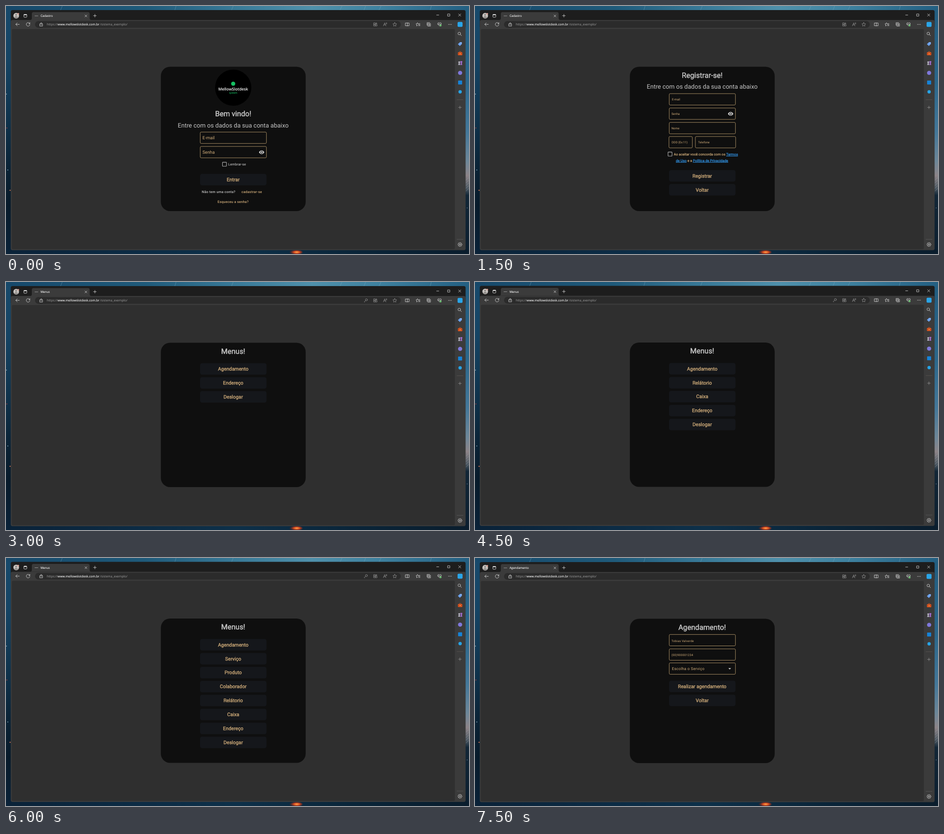
An HTML page that plays this animation: 1021x549 px, repeating every 9000 ms.

```html
<!DOCTYPE html>
<html lang="pt-BR">
<head>
<meta charset="utf-8">
<title>Cadastro</title>
<style>
  html, body { margin: 0; width: 100%; height: 100%; overflow: hidden; background: #0b2437; }
  svg { display: block; width: 100vw; height: 100vh; }
  text { font-family: Roboto, Arial, sans-serif; white-space: pre; text-rendering: geometricPrecision; }
  .ui text { font-family: "Open Sans", "Noto Sans", sans-serif; }
  .line { fill: none; stroke: #dedede; stroke-width: .85; stroke-linecap: round; stroke-linejoin: round; }
  .dim { stroke: #969696; }
</style>
</head>
<body>
<svg id="stage" viewBox="0 0 1021 549" preserveAspectRatio="none" xmlns="http://www.w3.org/2000/svg"></svg>
<script>
const LOOP = 9000, STEP = 1500;
const TAN = '#d2ae7b', EDGE = '#b4976a', PALE = '#c6c6c6', BLUE = '#339af0';
const MID = 501;

// --- drawing helpers ---
const rect = (x, y, w, h, r, fill, extra = '') =>
  `<rect x="${x}" y="${y}" width="${w}" height="${h}" rx="${r}" fill="${fill}" ${extra}/>`;
const disc = (x, y, r, fill) => `<circle cx="${x}" cy="${y}" r="${r}" fill="${fill}"/>`;
const oval = (x, y, rx, ry, fill) => `<ellipse cx="${x}" cy="${y}" rx="${rx}" ry="${ry}" fill="${fill}"/>`;
const shape = (d, fill) => `<path d="${d}" fill="${fill}"/>`;
const icon = (x, y, d, cls = '', extra = '') =>
  `<path class="line ${cls}" transform="translate(${x} ${y})" d="${d}" ${extra}/>`;

// Text placed by the middle of its capitals.
function label(s, x, cy, size, fill, { anchor = 'start', bold = 0, gap = 0, weight = 400 } = {}) {
  const stroke = bold ? `stroke="${fill}" stroke-width="${bold}"` : '';
  return `<text x="${x}" y="${(cy + size * .356).toFixed(2)}" font-size="${size}" fill="${fill}" ` +
    `text-anchor="${anchor}" letter-spacing="${gap}" font-weight="${weight}" ${stroke}>${s}</text>`;
}
const centred = (s, cy, size, fill, bold = 0) =>
  label(s, MID, cy, size, fill, { anchor: 'middle', bold });

const heading = (s, cy) => centred(s, cy, 16.1, PALE, .5);
const subtitle = cy => centred('Entre com os dados da sua conta abaixo', cy, 13.55, PALE);
const field = (y, x = 428.3, w = 146) =>
  rect(x, y, w, 25.2, 2.2, 'none', `stroke="${EDGE}" stroke-width=".95"`);
const button = (s, cy) =>
  rect(428, cy - 12.7, 146.5, 25.5, 4.5, '#15171b') + centred(s, cy - .1, 10.75, TAN, .35);
const checkbox = (x, y) =>
  rect(x, y, 8.8, 8.8, .8, 'none', 'stroke="#b9b9b9" stroke-width="1.1"');
const eye = cy =>
  `<g transform="translate(563.7 ${cy})">` +
  shape('M-6 0Q-3.6 -4.1 0 -4.1T6 0Q3.6 4.1 0 4.1T-6 0Z', '#cfcfcf') +
  disc(0, 0, 2.8, '#0f0f0f') + disc(0, 0, 1.7, '#cfcfcf') + '</g>';
const small = (s, x, cy, gap = 0) => label(s, x, cy, 6.55, TAN, { gap });

// --- screens ---
function login() {
  const link = { gap: .25, weight: 500 };
  return disc(501, 180.7, 40, '#000') +
    disc(501, 172, 4.6, '#16c264') +
    `<g class="ui">${label('MellowSlotdesk', MID, 184, 8.7, '#fff', { anchor: 'middle', weight: 600 })}` +
    `${label('system', MID, 191.8, 5.2, '#16c264', { anchor: 'middle', weight: 600 })}</g>` +
    heading('Bem vindo!', 238) + subtitle(264) +
    field(279.1) + label('E-mail', 433.2, 292, 9.8, TAN) +
    field(310.9) + label('Senha', 433.2, 323.7, 9.8, TAN) + eye(323.8) +
    checkbox(477.4, 345.9) + label('Lembrar-se', 490, 350.5, 7.5, '#dcdcdc', { gap: .14 }) +
    button('Entrar', 384.3) +
    label('Não tem uma conta?', 431.8, 411.2, 7.5, PALE, link) +
    label('cadastrar-se', 519.3, 411.2, 7.5, TAN, link) +
    label('Esqueceu a senha?', 466.4, 433.5, 7.5, TAN, link);
}

function register() {
  const link = s => `<tspan fill="${BLUE}" stroke="${BLUE}" text-decoration="underline">${s}</tspan>`;
  const terms = { bold: .22 };
  return heading('Registrar-se!', 152.8) + subtitle(178.6) +
    field(194) + small('E-mail', 434.2, 206.7) +
    field(225.8) + small('Senha', 433.2, 238.6) + eye(238.7) +
    field(257.7) + small('Nome', 433.2, 270.5) +
    field(288.9, 427.7, 51.6) + small('DDD (Ex:11)', 433.8, 301.5) +
    field(288.9, 486, 88.8) + small('Telefone', 492, 301.5) +
    checkbox(425.7, 323.4) +
    label('Ao aceitar você concorda com os ' + link('Termos'), 438.3, 328.2, 7.68, TAN, terms) +
    label(link('de Uso') + ' e a ' + link('Política de Privacidade'), 443, 341.9, 7.68, TAN, terms) +
    button('Registrar', 375.9) + button('Voltar', 406.8);
}

const menu = items =>
  heading('Menus!', 152.8) + items.map((s, i) => button(s, 192.5 + i * 30.87)).join('');

const booking = () =>
  heading('Agendamento!', 152.8) +
  field(169.3) + small('Tobias Valverde', 433.2, 183.2, .22) +
  field(201.2) + small('(00)900001234', 433.2, 215, .22) +
  field(232.2) + label('Escolha o Serviço', 434.3, 244.8, 8.55, TAN, { gap: .26 }) +
  shape('M558.7 243.7h6l-3 3.1z', '#d6d6d6') +
  button('Realizar agendamento', 284.2) + button('Voltar', 315.1);

const scenes = [
  { tab: 'Cadastro', body: login() },
  { tab: 'Cadastro', body: register() },
  { tab: 'Menus', key: true, body: menu(['Agendamento', 'Endereço', 'Deslogar']) },
  { tab: 'Menus', key: true, lift: .5,
    body: menu(['Agendamento', 'Relátorio', 'Caixa', 'Endereço', 'Deslogar']) },
  { tab: 'Menus', key: true, lift: .5,
    body: menu(['Agendamento', 'Serviço', 'Produto', 'Colaborador', 'Relátorio', 'Caixa', 'Endereço', 'Deslogar']) },
  { tab: 'Agendamento', body: booking() },
];

// --- wallpaper ---
function gradient(id, axis, stops) {
  const end = axis === 'y' ? 'x2="0" y2="1"' : 'x2="1" y2="0"';
  return `<linearGradient id="${id}" x1="0" y1="0" ${end}>` +
    stops.map(([at, c]) => `<stop offset="${at}" stop-color="${c}"/>`).join('') + '</linearGradient>';
}

function wallpaper() {
  const rain = [[120, 4], [372, 3], [497, 4], [736, 5], [789, 4], [822, 5], [935, 3]]
    .map(([x, d]) => `M${x + d} 0L${x} 10`).join('');
  const tufts = [380, 386, 392, 398, 404].map(y => `M1014 ${y + 6}L1020 ${y}`).join('');
  return '<defs>' +
    gradient('top', 'x', [[0, '#16486a'], [.3, '#1f5a7a'], [.5, '#397a98'], [.66, '#4f90ab'], [.8, '#3f82a0'], [1, '#235f82']]) +
    gradient('left', 'y', [[0, '#17496b'], [.2, '#164464'], [.35, '#123a56'], [.5, '#0e2f47'], [.68, '#0a2133'], [.8, '#081b2b'], [1, '#0a2238']]) +
    gradient('right', 'y', [[0, '#225d80'], [.3, '#2b678b'], [.5, '#44789a'], [.62, '#6d8799'], [.68, '#8d8488'], [.73, '#4d5963'], [.76, '#122636'], [1, '#0b1e2f']]) +
    gradient('low', 'x', [[0, '#0a2238'], [.3, '#0c2c45'], [.5, '#0d3049'], [.75, '#0a2539'], [1, '#0a1d2d']]) +
    '<radialGradient id="glow" cx=".62"><stop offset="0" stop-color="#ffb650"/>' +
    '<stop offset=".4" stop-color="#d9481f"/><stop offset="1" stop-color="#5a1a16" stop-opacity="0"/></radialGradient>' +
    '</defs>' +
    rect(0, 0, 1021, 549, 0, '#0b2437') +
    rect(0, 0, 1021, 12, 0, 'url(#top)') + rect(0, 8, 12, 541, 0, 'url(#left)') +
    rect(1012, 8, 9, 541, 0, 'url(#right)') + rect(0, 539, 1021, 10, 0, 'url(#low)') +
    `<path d="${rain}" stroke="#86b3c8" stroke-width=".7" opacity=".6"/>` +
    `<path d="${tufts}" stroke="#a3a3a6" stroke-width=".7" opacity=".7"/>` +
    oval(637, 545, 17, 6, 'url(#glow)') +
    disc(1, 195, 1, '#8fb0c4') + disc(4, 363, 1.1, '#7fa0b4') + disc(9, 408, 1.3, '#c87050') +
    disc(2, 270, 1.2, '#7a3a42') + disc(1017, 447, 1, '#50667a');
}

// --- browser window ---
const STAR = 'M0 -4.2L1.3 -1.5L4.2 -1.1L2.1 1L2.6 3.9L0 2.5L-2.6 3.9L-2.1 1L-4.2 -1.1L-1.3 -1.5Z';
const PLUS = 'M-3.2 0h6.4M0 -3.2v6.4';

function gear() {
  let d = '';
  for (let i = 0; i <= 32; i++) {
    const a = i * Math.PI / 16, r = i % 4 < 2 ? 4.4 : 3.5;
    d += (i ? 'L' : 'M') + (r * Math.cos(a)).toFixed(2) + ' ' + (r * Math.sin(a)).toFixed(2);
  }
  return icon(1001, 528, d + 'ZM1.4 0A1.4 1.4 0 1 1 -1.4 0A1.4 1.4 0 1 1 1.4 0');
}

function titleBar() {
  return rect(10.5, 9, 1003, 40, 4, '#1d1d1d') +
    shape('M53 31Q57 31 57 27V17.5Q57 13.5 61 13.5H180.5Q184.5 13.5 184.5 17.5V27Q184.5 31 188.5 31Z', '#3b3b3b') +
    disc(22.5, 21.5, 6.2, '#c9c5c1') + disc(22.3, 19.6, 2.2, '#8f8b88') +
    shape('M18.3 25.7Q19 22.6 22.3 22.6T26.4 25.7Q22.5 28 18.3 25.7Z', '#8f8b88') +
    disc(27, 17.3, 1.9, '#e0a49a') +
    rect(39.3, 18.5, 6.6, 6.4, 1.2, 'none', 'stroke="#e4e4e4" stroke-width=".9"') +
    rect(39.3, 18.3, 6.6, 2, .8, '#e4e4e4') +
    rect(63.3, 21.5, 7.4, .9, 0, '#a9a9a9') +
    icon(176.3, 22, 'M-2.2 -2.2L2.2 2.2M2.2 -2.2L-2.2 2.2') +
    icon(196, 21.5, PLUS) +
    icon(952, 20, 'M-2.5 0h5') + icon(976.5, 20, 'M-2.3 -2.3h4.6v4.6h-4.6Z') +
    icon(1000.5, 20, 'M-2.6 -2.6L2.6 2.6M2.6 -2.6L-2.6 2.6');
}

function toolBar() {
  return rect(10.5, 31, 1003, 509.5, 4, '#3b3b3b') +
    rect(64, 33.2, 806.5, 15, 7.5, '#2b2b2b') +
    icon(25.5, 40.6, 'M4 0H-4M-.6 -3.4L-4 0L-.6 3.4') +
    icon(48.7, 40.7, 'M3.8 -1.5A4 4 0 1 0 4 .6M4 -4v2.6h-2.6') +
    icon(77.7, 41, 'M-3 -1.4h6v4.8h-6ZM-1.6 -1.4v-1A1.6 1.6 0 0 1 1.6 -2.4v1M0 .6v.8') +
    label('https://', 90, 40.6, 6.95, '#a4a4a4') +
    label('www.mellowslotdesk.com.br', 113.8, 40.6, 6.9, '#fff', { bold: .12 }) +
    label('/sistema_exemplo/', 207.2, 40.6, 6.9, '#a4a4a4') +
    icon(793.5, 40.7, 'M3.6 -1.3A2.3 2.3 0 1 1 -1 -1.3A2.3 2.3 0 1 1 3.6 -1.3M-.4 .2L-3.4 3.2M-3.4 3.2L-2.5 4', 'dim', 'id="key"') +
    icon(814.7, 40.7, 'M-3.6 -3.4h3.2v3.2h-3.2ZM-3.6 .3h3.2v3.2h-3.2ZM.3 .3h3.2v3.2h-3.2ZM2 -3.8v3.2M.4 -2.2h3.2', 'dim') +
    icon(836, 40.7, 'M-3.8 3.4L-1 -3.4L1.8 3.4M-2.8 1h3.6M2 -3.2Q3 -2.2 2 -1.2M3.2 -4Q4.9 -2.2 3.2 -.4', 'dim') +
    icon(857.3, 40.7, STAR, 'dim') +
    icon(885, 40.7, 'M-4 -3h8v6h-8ZM0 -3.6v7.2') +
    icon(908.7, 40.7, 'M1.5 -1L-.2 -1.3L-1.3 -3.8L-2.4 -1.3L-4.6 -1L-2.9 .8L-3.3 3.5L-1.3 2.3M1.7 -1.5h2.6M1 .7h3.3M1 2.8h3.3') +
    icon(932.3, 40.7, 'M-1.8 -1.8h5.6v5.6h-5.6ZM-3.8 2v-5.8h5.8M1 -.5v3M-.5 1h3') +
    icon(956, 40.5, 'M4 -.5Q4.4 -3.5 2 -3.5Q.7 -3.5 0 -2.3Q-.7 -3.5 -2 -3.5Q-4.4 -3.3 -4 -.5Q-3.2 1.5 0 3.5M-3.6 0h2l1 -1.3l1.3 2.5l.8 -1.2h2') +
    disc(958.3, 43, 2.2, '#6cbf73') +
    [976, 979, 982].map(x => disc(x, 40.7, .75, '#e2e2e2')).join('') +
    rect(995.8, 35.3, 11, 11, 2.5, '#2aa5e8');
}

function sideBar() {
  return icon(1000.2, 61.5, 'M2.3 -.6A2.9 2.9 0 1 1 -3.5 -.6A2.9 2.9 0 1 1 2.3 -.6M1.5 1.5L4.4 4.2') +
    shape('M996.5 84.5L1001 80H1005.3V84.3L1000.8 88.5Z', '#6ea3ef') + disc(1003.6, 81.7, .7, '#dbe8ff') +
    rect(996.6, 102.5, 9.6, 6.6, 1, '#e0561f') + rect(996.6, 105.2, 9.6, .9, 0, '#a8380f') +
    rect(999.4, 101, 4, 2, .6, 'none', 'stroke="#e0561f" stroke-width=".9"') + rect(1000.7, 104.7, 1.5, 1.9, .3, '#f5d28a') +
    disc(999.4, 124.2, 1.8, '#c8c4d4') + shape('M997.2 130.5L998.6 125.5H1000.2L1001.6 130.5Z', '#b9b5c8') +
    shape('M1001.8 122H1006.2V125L1005.2 126L1006.2 130.5H1001.8L1002.8 126L1001.8 125Z', '#9b6bc8') +
    disc(1001.4, 148, 4.6, '#7f78dc') +
    rect(997, 164.9, 8.8, 8.8, 1, '#1683d8') +
    disc(1001.4, 190, 3.7, '#27a4e6') +
    rect(993.8, 207.2, 14.5, .8, 0, '#5c5753') + icon(1001, 224.5, PLUS, 'dim') +
    rect(993.8, 516, 14.5, .8, 0, '#5c5c5c') + gear();
}

const stage = document.getElementById('stage');
stage.innerHTML = wallpaper() +
  `<g id="win"><g class="ui">${titleBar()}${toolBar()}` +
  `<g id="tab">${label('', 76.3, 21.7, 6.45, '#fff', { bold: .1 })}</g>` +
  sideBar() + '</g>' +
  rect(12.8, 51, 977, 487.3, 2.5, '#2f2f2f') +
  rect(341.5, 134.6, 319.3, 319.3, 20, '#0f0f0f') +
  scenes.map(s => `<g class="scene">${s.body}</g>`).join('') + '</g>';

const win = document.getElementById('win');
const tab = document.querySelector('#tab text');
const key = document.getElementById('key');
const layers = stage.querySelectorAll('.scene');
let shown = -1;

function show(ms) {
  const n = Math.floor((ms % LOOP) / STEP);
  if (n === shown) return;
  shown = n;
  const scene = scenes[n];
  layers.forEach((g, i) => g.setAttribute('display', i === n ? 'inline' : 'none'));
  key.setAttribute('display', scene.key ? 'inline' : 'none');
  tab.textContent = scene.tab;
  win.setAttribute('transform', `translate(0 ${-(scene.lift || 0)})`);
}

const start = performance.now();
function tick() {
  show(performance.now() - start);
  requestAnimationFrame(tick);
}
tick();
</script>
</body>
</html>
```
